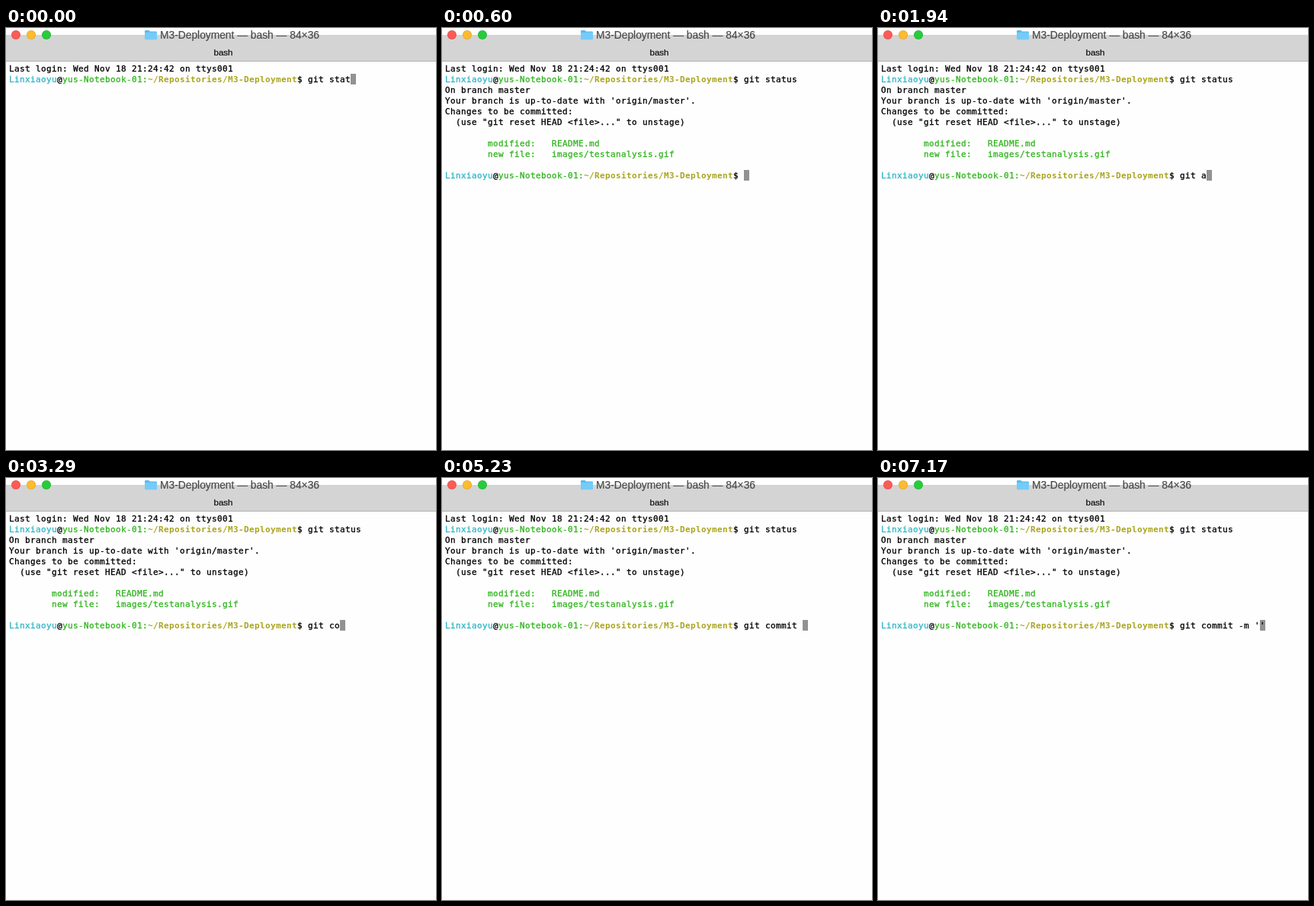
An HTML page for the animation above (8 s loop, 564 by 553 pixels).

```html
<!DOCTYPE html>
<html lang="en">
<head>
<meta charset="utf-8">
<title>Terminal</title>
<style>
  html, body { margin: 0; width: 100%; height: 100%; overflow: hidden; background: #fefefe; }
  #stage { position: relative; width: 564px; height: 553px; overflow: hidden; background: #fefefe; }
  .bar { position: absolute; left: 0; top: 9px; width: 564px; height: 34px; background: #d4d4d4; border-bottom: 1px solid #b1b1b1; }
  .light { position: absolute; top: 3px; width: 12px; height: 12px; border-radius: 50%; box-shadow: inset 0 0 0 .6px rgba(0, 0, 0, .14); }
  .folder { position: absolute; left: 182px; top: 2px; }
  .title, .tab { position: absolute; white-space: pre; font-family: "Liberation Sans", Arial, sans-serif; -webkit-text-stroke: .2px; }
  .title { left: 202px; top: 1px; font-size: 13.8px; line-height: 17px; color: #4a4a4a; }
  .tab { left: 272.5px; top: 25px; font-size: 11.5px; line-height: 14px; color: #0a0a0a; }
  #screen {
    position: absolute; left: 4px; top: 46px; padding-top: 1px; isolation: isolate; white-space: pre; color: #000;
    font: 11px/14px "DejaVu Sans Mono", Menlo, monospace;
    letter-spacing: calc(7px - 1ch);
    -webkit-text-stroke: .3px;
  }
  #screen div { height: 14px; }
  #screen #cursor { position: absolute; z-index: -1; width: 7px; height: 14px; background: #929292; }
  .user { color: #2fb4c6; }
  .ok { color: #2fb41d; }
  .path { color: #aaa41e; font-weight: bold; -webkit-text-stroke: 0; }
</style>
</head>
<body>
<div id="stage">
  <div class="bar"></div>
  <div class="light" style="left:7px;background:#fc5b57"></div>
  <div class="light" style="left:27px;background:#fdbb2f"></div>
  <div class="light" style="left:47px;background:#28cb3c"></div>
  <svg class="folder" width="16" height="14">
    <path d="M0 2.2Q0 1 1.2 1H5.4L7 2.6H14.8Q16 2.6 16 3.8V5H0Z" fill="#5bb9ea"/>
    <rect y="3.8" width="16" height="9.4" rx="1" fill="#74cbf8"/>
  </svg>
  <div class="title">M3-Deployment — bash — 84×36</div>
  <div class="tab">bash</div>
  <div id="screen"></div>
</div>
<script>
const LOOP = 8000, COL = 7, ROW = 14, PROMPT_COLS = 56;
const OUTPUT_AT = 600;
const prompt = '<span class="user">Linxiaoyu</span>@<span class="ok">yus-Notebook-01:</span>' +
  '<span class="path">~/Repositories/M3-Deployment</span>$ ';
const output = [
  "On branch master",
  "Your branch is up-to-date with 'origin/master'.",
  "Changes to be committed:",
  '  (use "git reset HEAD &lt;file&gt;..." to unstage)',
  "",
  '<span class="ok">        modified:   README.md</span>',
  '<span class="ok">        new file:   images/testanalysis.gif</span>',
  ""
];

// Keys in typing order: "<" is backspace, "^" moves the cursor left.
const firstKeys = { keys: "us", times: [150, 300] };
const nextKeys = {
  keys: "git a<commit -m ''^",
  times: [1350, 1490, 1640, 1790, 1940, 2840, 3140, 3290, 3730, 4030,
    4180, 4330, 5230, 5370, 5820, 6120, 6570, 6720, 7170]
};

function typed(text, { keys, times }, t) {
  let pos = text.length;
  times.forEach((at, i) => {
    if (t < at) return;
    const key = keys[i];
    if (key === "<") text = text.slice(0, --pos);
    else if (key === "^") pos--;
    else { text += key; pos++; }
  });
  return { text, pos };
}

const screen = document.getElementById("screen");
let shown = "";

function draw(t) {
  const first = typed("git stat", firstKeys, t);
  const lines = ["Last login: Wed Nov 18 21:24:42 on ttys001", prompt + first.text];
  let { pos } = first;
  if (t >= OUTPUT_AT) {
    const next = typed("", nextKeys, t);
    lines.push(...output, prompt + next.text);
    pos = next.pos;
  }
  const left = (PROMPT_COLS + pos) * COL, top = (lines.length - 1) * ROW;
  const html = lines.map(line => `<div>${line}</div>`).join("") +
    `<div id="cursor" style="left:${left}px;top:${top}px"></div>`;
  if (html !== shown) screen.innerHTML = shown = html;
}

const start = performance.now();
function tick() {
  draw((performance.now() - start) % LOOP);
  requestAnimationFrame(tick);
}
tick();
</script>
</body>
</html>
```
